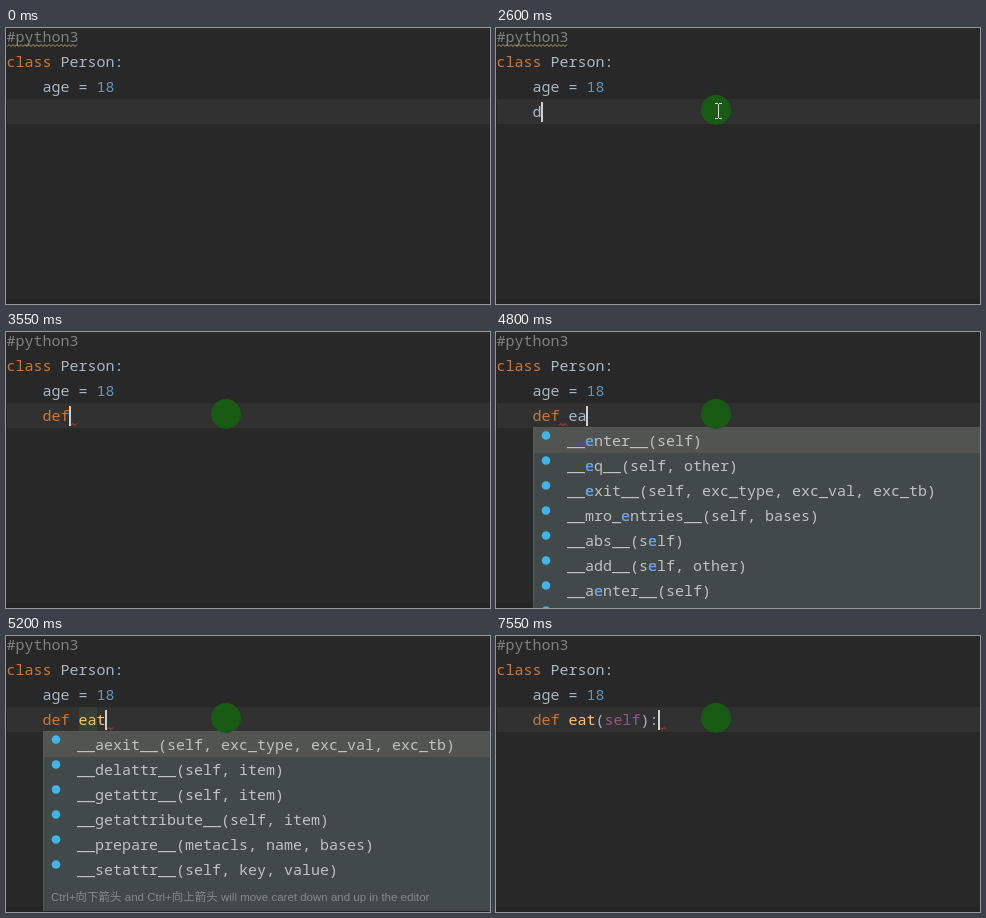
These frames come from a looping animation (484 px wide and 276 px high, 8000 ms). An HTML page with a canvas:

```html
<!DOCTYPE html>
<html lang="en">
<head>
<meta charset="utf-8">
<title>Typing a method</title>
<style>
html, body { margin: 0; width: 100%; height: 100%; overflow: hidden; background: #282828; }
canvas { display: block; }
</style>
</head>
<body>
<canvas id="stage" width="484" height="276"></canvas>
<script>
const ctx = document.getElementById('stage').getContext('2d');
const LOOP = 8000, CELL = 9, ROW = 25;
const MONO = '15px "Noto Sans Mono", monospace';
const INK = '#a9b7c6', KEYWORD = '#cc7832', NAME = '#ffc66d', SELF = '#94558d';

const dItems = ['def', 'del', 'dict', 'delattr(o, name)', 'dir(o)', 'divmod(x, y)', 'DeprecationWarning', 'id(o)'];
const eItems = ['__enter__(self)', '__eq__(self, other)', '__exit__(self, exc_type, exc_val, exc_tb)',
  '__mro_entries__(self, bases)', '__abs__(self)', '__add__(self, other)', '__aenter__(self)', '__aexit__(self)'];
const eatItems = ['__aexit__(self, exc_type, exc_val, exc_tb)', '__delattr__(self, item)', '__getattr__(self, item)',
  '__getattribute__(self, item)', '__prepare__(metacls, name, bases)', '__setattr__(self, key, value)'];
const HINT = 'Ctrl+向下箭头 and Ctrl+向上箭头 will move caret down and up in the editor';

const def = ['def ', KEYWORD];
// Each step changes part of the editor state; text is a list of [string, colour].
const steps = [
  [0, { text: [], warn: true, beam: true }],
  [1150, { caret: 4 }],
  [1650, { caret: 0 }],
  [2150, { caret: 4 }],
  [2600, { text: [['d', INK]], caret: 5 }],
  [2650, { popup: { x: 0, items: dItems, match: 'd' }, beam: false }],
  [2850, { text: [['de', INK]], caret: 6 }],
  [2900, { popup: { x: 0, items: dItems.slice(0, 2).concat('delattr(o, name)', 'DeprecationWarning'), match: 'de', hint: true } }],
  [3000, { text: [def], caret: 7, popup: null }],
  [3250, { error: [65, 71] }],
  [3550, { warn: false }],
  [3900, { caret: 8, error: [74, 80] }],
  [4200, { error: [63, 71] }],
  [4350, { text: [def, ['e', INK]], caret: 9 }],
  [4400, { popup: { x: 37, items: eItems, match: 'e' } }],
  [4800, { text: [def, ['ea', INK]], caret: 10 }],
  [4850, { popup: { x: 37, items: ['__aenter__(self)', ...eatItems], match: '' } }],
  [5150, { text: [def, ['eat', NAME]], caret: 11, usage: true, error: [101, 107] }],
  [5200, { popup: { x: 37, items: eatItems, match: '', hint: true } }],
  [5700, { caret: 0 }],
  [6000, { text: [def, ['eat', NAME], ['(self):', INK]], caret: 16, popup: null, error: null }],
  [6300, { text: [def, ['eat', NAME], ['(', INK], ['self', SELF], ['):', INK]], usage: false, braces: true, error: [162, 170] }],
  [7100, { caret: 17 }],
  [7450, { caret: 18 }],
  [7550, { braces: false }]
];

function box(x, y, w, h, color) {
  ctx.fillStyle = color;
  ctx.fillRect(x, y, w, h);
}

function disc(x, y, r, color) {
  ctx.fillStyle = color;
  ctx.beginPath();
  ctx.arc(x, y, r, 0, 7);
  ctx.fill();
}

function write(parts, x, y) {
  ctx.font = MONO;
  for (const [str, color] of parts) {
    ctx.fillStyle = color;
    ctx.fillText(str, x, y);
    x += str.length * CELL;
  }
}

function squiggle(x1, x2, y, color) {
  ctx.strokeStyle = color;
  ctx.lineWidth = 1;
  ctx.beginPath();
  for (let x = x1, up = 0; x <= x2; x += 2, up ^= 1) ctx.lineTo(x, y - 2 * up);
  ctx.stroke();
}

function drawPopup({ x, items, match, hint }) {
  box(x, 95, 484 - x, hint ? items.length * ROW + 30 : 181, '#424949');
  box(x, 96, 484 - x, ROW, '#515450');
  box(x, 95, 484 - x, 1, '#555a58');
  box(x, 95, 1, hint ? items.length * ROW + 30 : 181, '#555a58');
  items.forEach((item, i) => {
    const y = 114 + i * ROW, at = match ? item.indexOf(match) : -1;
    disc(x + 13, y - 10.5, 4.3, '#40b6e8');
    write([[item, '#c0c2c2']], x + 34, y);
    if (at >= 0) write([[match, '#589df6']], x + 34 + at * CELL, y);
  });
  if (hint) {
    ctx.font = '11.5px "Liberation Sans", "Noto Sans CJK SC", "Noto Sans CJK", sans-serif';
    ctx.fillStyle = '#858989';
    ctx.fillText(HINT, x + 8, 115 + items.length * ROW);
  }
}

function drawPointer(t, beam) {
  if (t < 100) return;
  const u = Math.min(1, (t - 100) / 450), e = u * u * (3 - 2 * u);
  const bend = (a, b, c) => (1 - e) * (1 - e) * a + 2 * e * (1 - e) * b + e * e * c;
  const x = bend(280, 200, 220), y = bend(237, 130, 82);
  const click = t >= 1100 && t < 1150;
  disc(x, y, click ? 16 : 15, click ? '#247020' : '#195a14');
  if (!beam) return;
  const bx = Math.round(x) + 2, by = Math.round(y);
  box(bx, by - 6, 1, 14, '#d8d8d8');
  for (const dy of [-7, 8]) {
    box(bx - 3, by + dy, 3, 1, '#d8d8d8');
    box(bx + 1, by + dy, 3, 1, '#d8d8d8');
  }
}

function draw(t) {
  const s = Object.assign({}, ...steps.filter(([at]) => at <= t).map(([, change]) => change));
  box(0, 0, 484, 276, '#282828');
  box(1, 71, 483, 25, '#313131');
  box(0, 271, 484, 5, '#242424');
  write([['#python3', '#808080']], 0.5, 14);
  if (s.warn) squiggle(1, 72, 18.5, '#a9a56d');
  write([['class ', KEYWORD], ['Person:', INK]], 0.5, 39);
  write([['age = ', INK], ['18', '#6897bb']], 36.5, 64);
  if (s.usage) box(73, 71, 18, 25, '#344134');
  if (s.braces) for (const x of [100, 145]) box(x, 71, 9, 25, '#3b514d');
  write(s.text, 36.5, 89);
  if (s.error) squiggle(...s.error, 93.5, '#d04038');
  if (s.caret) box(s.caret * CELL, 74, 2, 20, '#d0d0d0');
  if (s.popup) drawPopup(s.popup);
  drawPointer(t, s.beam);
}

const start = performance.now();
function tick() {
  const t = (performance.now() - start) % LOOP;
  draw(Math.floor(t / 50) * 50);
  requestAnimationFrame(tick);
}
tick();
</script>
</body>
</html>
```
